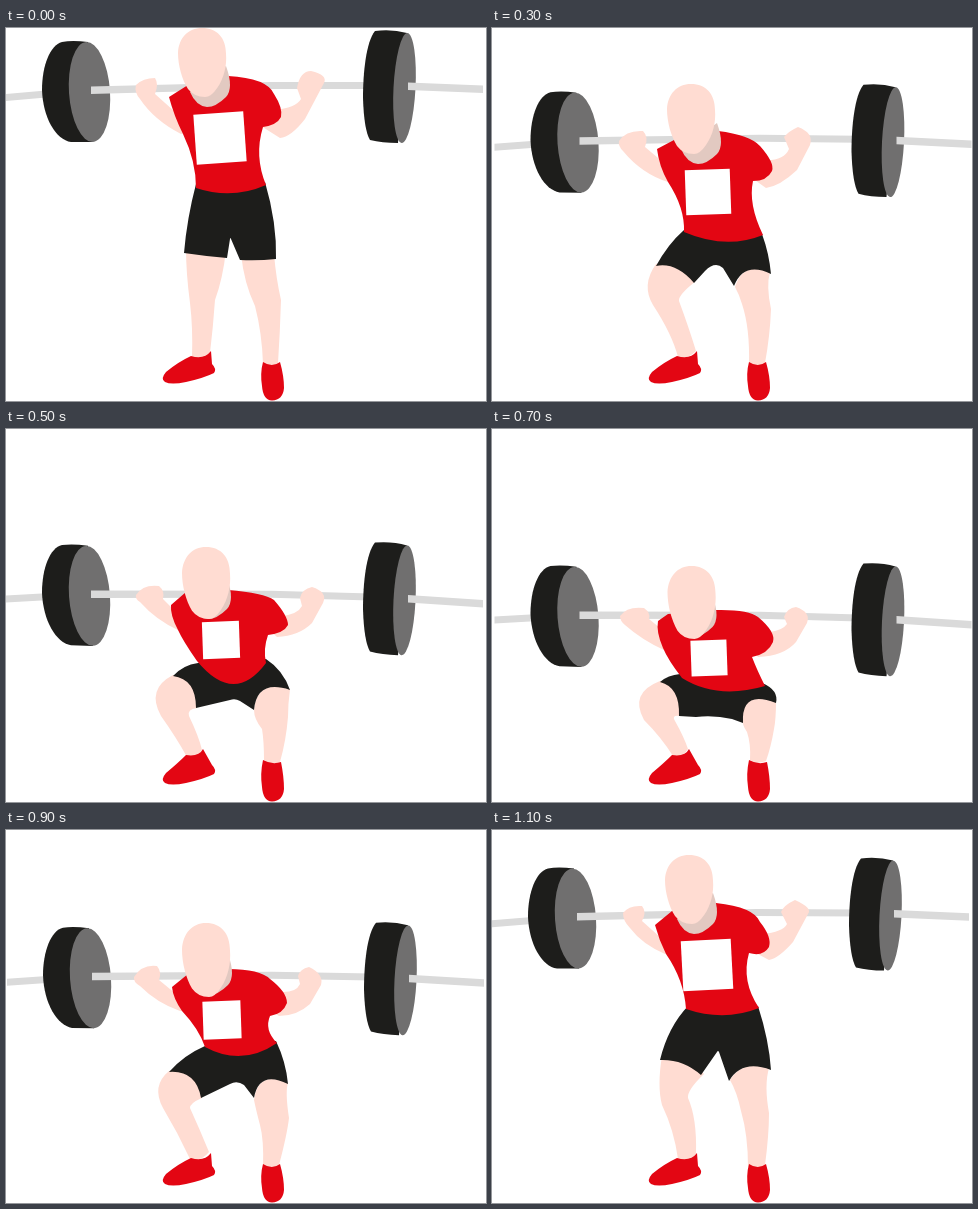
Animation of 480 by 373 pixels, one loop 1200 ms. Source, as an HTML page:

```html
<!DOCTYPE html>
<html lang="en">
<head>
<meta charset="utf-8">
<title>Squat</title>
<style>
  html, body { margin: 0; width: 100%; height: 100%; overflow: hidden; background: #fff; }
  svg { display: block; width: 100%; height: 100%; }
  .bar { fill: #dadada; }
  .rim { fill: #1d1d1b; }
  .face { fill: #706f6f; }
  .skin { fill: #ffdcd2; }
  .shade { fill: #e2c9c1; }
  .red { fill: #e30613; }
  .badge { fill: #fff; }
</style>
</head>
<body>
<svg viewBox="0 0 480 373">
  <g id="barbell">
    <path class="bar" d="M0 66L40 62.500V69.500L0 73Z"/>
    <path class="rim" d="M82 14Q66 12 56 14C44 17 36 38 36 62C37 90 50 112 65 114H87Z"/>
    <ellipse class="face" cx="83.500" cy="64" rx="20.500" ry="50" transform="rotate(-4 83.500 64)"/>
    <path class="bar" d="M85 58.500L265 54L365 54V61L265 61L85 66Z"/>
    <path class="rim" d="M401 5Q386 1 369 3C360 14 357 45 357 70Q358 102 364 112Q376 115 392 115Z"/>
    <ellipse class="face" cx="398.500" cy="60" rx="11" ry="55" transform="rotate(3 398.500 60)"/>
    <path class="bar" d="M402 54.500L477 57.500V65L402 62Z"/>
  </g>
  <path id="legL" class="skin"/>
  <path id="legR" class="skin"/>
  <path id="shoes" class="red"/>
  <path id="shorts" class="rim"/>
  <path id="armL" class="skin"/>
  <path id="armR" class="skin"/>
  <path id="shirt" class="red"/>
  <rect id="badge" class="badge" x="-.5" y="-.5" width="1" height="1"/>
  <path id="neck" class="shade" d="M24 38Q32 60 24 69Q14 79 5 79Q-6 78 -12 64Z"/>
  <path id="head" class="skin" d="M0 0C15 0 24 10 24 26C25 38 22 51 15 61Q9 70 3 70Q-8 70 -14 62C-20 52 -24 38 -24 25C-23 10 -14 0 0 0Z"/>
</svg>
<script>
// bar: dx, left drop, right drop; head: x, y, height, neck dx, neck dy;
// badge: x, y, size, angle; rise: how far the ankles lift the shoe tops
const stand = {
  bar: [0, 0, 0], head: [196, 0, 69, 0, 0], badge: [214, 110, 50, -4], rise: [0],
  legL: "M180 220Q200 218 220 222Q217 250 209 272Q207 300 204 325Q195 334 186 329Q187 300 184 275Q180 245 180 220Z",
  legR: "M235 226Q252 222 268 226Q270 250 275 272Q274 305 272 335Q264 341 257 336Q256 305 249 278Q238 255 235 226Z",
  shorts: "M190 156L259 154Q271 195 270 231Q252 233 234 232L225 211Q224 209 224 211L221 230Q198 228 178 225Q181 190 190 156Z",
  armL: "M130 57Q137 50 149 50Q153 56 149 66L168 83L184 104L175 106Q148 92 134 71Q128 64 130 57Z",
  armR: "M291 60Q294 43 305 43Q322 47 318 55L299 91Q285 109 274 110L255 98L268 82Q290 80 295 71Z",
  shirt: "M182 57L222 48Q261 50 268 66Q277 80 275 89Q271 97 257 99Q248 128 260 157Q226 172 190 160Q190 133 177 106Q168 88 163 69Z"
};
const dip = {
  bar: [0, 24.5, 25.5], head: [197, 25, 69, 0, 0], badge: [215, 135, 50, -3], rise: [0],
  legL: "M170 226Q192 222 212 244Q195 260 196 268Q205 288 204 324Q195 333 186 329Q182 300 170 275Q165 256 170 226Z",
  legR: "M238 250Q250 230 277 238Q272 255 277 283Q277 305 273 335Q264 341 256 337Q256 305 249 281Q245 262 238 250Z",
  shorts: "M196 176L266 176Q277 210 279 240Q250 229 237 251L227 222Q226 220 225 222L209 245Q191 229 168 230Q176 197 196 176Z",
  armL: "M131 83Q137 75 150 76Q155 82 150 91L169 108L184 122L173 124Q150 114 138 98Q131 91 131 83Z",
  armR: "M289 82Q292 75 303 70Q321 78 316 84L301 112Q287 128 277 130L262 122L270 104Q291 102 295 94Z",
  shirt: "M180 81L224 73Q262 77 268 92Q280 107 277 117Q271 127 257 123Q249 151 267 178Q232 192 194 179Q192 150 174 124Q167 110 163 95Z"
};
const quarter = {
  bar: [2.5, 50.5, 54], head: [199, 56, 70, 2, 1], badge: [216, 164, 45, -2], rise: [0],
  legL: "M164 236Q186 230 204 253Q186 267 187 273Q197 300 204 323Q195 332 186 329Q180 306 161 277Q149 257 164 236Z",
  legR: "M243 259Q252 232 278 244Q274 258 279 281Q278 308 273 335Q264 341 257 337Q258 300 250 276Q247 266 243 259Z",
  shorts: "M192 202L270 206Q277 225 279 246Q252 233 242 258L231 240Q223 233 213 243L202 255Q184 234 164 238Q176 216 192 202Z",
  armL: "M127 113Q134 102 151 103Q157 109 153 119L172 135L186 154L176 154Q150 146 131 123Q126 118 127 113Z",
  armR: "M292 109Q297 103 306 99Q322 105 318 117L305 142Q288 158 274 160L260 150L272 132Q292 133 297 121Z",
  shirt: "M182 112L226 103Q258 107 268 118Q283 135 280 143Q275 153 261 153Q256 176 271 207Q234 222 192 204Q193 180 176 154Q167 138 165 121Z"
};
const half = {
  bar: [1, 84, 90], head: [200, 93, 74, -2, -7], badge: [216, 190, 38, -2], rise: [0],
  legL: "M163 241Q192 234 196 268Q184 273 184 278Q194 300 203 322Q195 332 184 329Q172 303 157 278Q145 256 163 241Z",
  legR: "M248 270Q252 240 282 253Q279 262 283 288Q281 305 273 335Q264 341 257 337Q258 310 254 295Q250 280 248 270Z",
  shorts: "M199 216L270 211Q280 232 282 254Q253 240 248 268L238 255Q231 250 224 254L195 268Q190 240 163 242Q178 225 199 216Z",
  armL: "M128 147Q136 134 151 136Q156 142 153 150L170 164L188 182L174 181Q151 173 134 156Q127 152 128 147Z",
  armR: "M292 146Q294 139 303 137Q318 144 315 155L304 174Q291 186 273 186L258 176L274 162Q290 163 294 154Z",
  shirt: "M182 144L222 139Q254 139 264 149Q281 162 281 173Q277 184 264 186Q258 200 271 213Q236 237 199 217Q193 199 176 181Q167 168 166 157Z"
};
const low = {
  bar: [0, 102.5, 111], head: [200, 118, 72, -3, -7], badge: [215, 211, 37, -2], rise: [1],
  legL: "M167 246Q192 244 191 279Q181 280 183 287Q193 308 196 321Q190 330 181 328Q170 308 155 287Q140 260 167 246Z",
  legR: "M248 281Q251 250 284 260Q282 275 282 288Q280 312 274 333Q265 337 258 331Q258 312 256 300Q248 290 248 281Z",
  shorts: "M192 234L260 230Q277 241 284 261Q251 250 248 281L234 272Q229 269 224 271L190 279Q190 250 167 247Q177 236 192 234Z",
  armL: "M130 166Q137 155 153 157Q159 162 157 170L168 181L188 203L172 201Q150 191 134 173Q129 170 130 166Z",
  armR: "M294 169Q296 160 306 158Q322 163 317 174L306 194Q293 207 271 208L258 196L276 187Q292 185 296 177Z",
  shirt: "M180 163L222 161Q258 164 268 171Q282 187 282 196Q278 204 262 206Q257 220 260 234Q228 277 191 232Q177 212 172 201Q164 186 165 176Z"
};
const bottom = {
  bar: [2.5, 123.5, 132], head: [199.5, 137, 73, -3, -8], badge: [217, 229, 36, -2], rise: [1],
  legL: "M168 252Q189 252 188 287Q179 286 183 292Q192 308 196 320Q190 330 181 327Q169 308 152 291Q137 264 168 252Z",
  legR: "M250 288Q250 262 284 273Q284 290 282 300Q279 318 274 332Q265 336 258 331Q259 315 255 303Q250 296 250 288Z",
  shorts: "M188 245L270 254Q287 261 284 274Q249 260 251 294L240 290Q222 286 204 288L187 287Q188 258 168 253Q176 246 188 245Z",
  armL: "M128 187Q135 177 152 179Q159 184 157 190L168 199L190 224L172 221Q150 211 133 196Q128 192 128 187Z",
  armR: "M292 188Q295 179 304 178Q319 183 315 194L304 213Q292 227 266 228L256 214L278 203Q291 201 295 195Z",
  shirt: "M176 185L222 181Q256 180 266 188Q284 203 281 213Q276 225 260 228Q265 241 273 257Q225 271 190 249Q176 231 171 219Q164 203 166 192Z"
};

function blend(a, b, k) {
  const mix = (x, y) => x + (y - x) * k;
  const out = {};
  for (const key in a) {
    if (Array.isArray(a[key])) {
      out[key] = a[key].map((x, i) => mix(x, b[key][i]));
    } else {
      const other = b[key].match(/[\d.]+/g);
      let i = 0;
      out[key] = a[key].replace(/[\d.]+/g, x => mix(+x, +other[i++]));
    }
  }
  return out;
}

const nearBottom = blend(low, bottom, 0.55);
const STEP = 100;
const cycle = [stand, stand, dip, quarter, half, low, nearBottom, bottom, low, half, quarter, dip];
const limbs = ["legL", "legR", "shorts", "armL", "armR", "shirt"];
const set = (id, attr, value) => document.getElementById(id).setAttribute(attr, value);

const shoes = r =>
  `M${185 - 5 * r} ${328 - 2 * r}Q172 334 160 344Q154 351 159 354Q165 357 180 354Q198 350 208 345` +
  `Q211 341 206 336L${205 - 8 * r} ${323 - 3 * r}Q${198 - 5 * r} ${332 - 4 * r} ${185 - 5 * r} ${328 - 2 * r}Z` +
  `M257 ${334 - 3 * r}Q254 345 256 358Q257 372 266 372.5Q277 372 278 360Q278 348 ${274 + r} ${334 - r}` +
  `Q266 ${340 - 4 * r} 257 ${334 - 3 * r}Z`;

function draw(pose) {
  const [dx, left, right] = pose.bar;
  const tilt = (right - left) / 315;
  set("barbell", "transform", `matrix(1 ${tilt} 0 1 ${dx} ${left - 70 * tilt})`);
  limbs.forEach(id => set(id, "d", pose[id]));
  set("shoes", "d", shoes(pose.rise[0]));
  const [x, y, h, nx, ny] = pose.head;
  set("head", "transform", `translate(${x} ${y}) scale(1 ${h / 70})`);
  set("neck", "transform", `translate(${x + nx} ${y + ny})`);
  const [bx, by, size, angle] = pose.badge;
  set("badge", "transform", `translate(${bx} ${by}) rotate(${angle}) scale(${size})`);
}

const start = performance.now();
let shown;
function tick() {
  const pose = cycle[Math.floor((performance.now() - start) / STEP) % cycle.length];
  if (pose !== shown) draw(shown = pose);
  requestAnimationFrame(tick);
}
tick();
</script>
</body>
</html>
```
